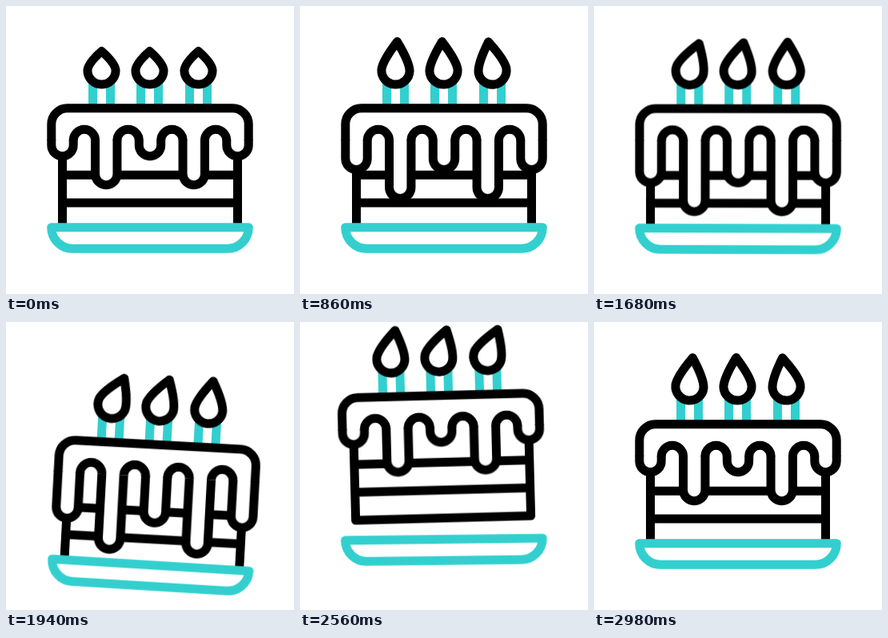
Recreate the animation shown at these times as an HTML page without scripts. Size 360 by 360 pixels, loop 3 s.

```html
<!DOCTYPE html>
<html lang="en">
<head>
<meta charset="utf-8">
<title>Birthday cake</title>
<style>
html, body { margin: 0; width: 100%; height: 100%; overflow: hidden; background: #fff; }
svg { display: block; width: 100vw; height: 100vh; }
path { fill: #fff; stroke: #000; stroke-width: 11; stroke-linejoin: round; }
.teal { stroke: #33cfcf; }
.line { fill: none; }

.cake, .plate, .drips, .flame { animation: 3s infinite; }
.cake, .plate { animation-timing-function: cubic-bezier(.6, 0, .6, 1); }
.cake { transform-origin: 180px 277px; animation-name: hop; }
.plate { transform-origin: 180px 290px; animation-name: tip; animation-timing-function: ease-in-out; }
.drips { animation-name: drip; animation-timing-function: linear; }
.flame { animation-timing-function: ease-in-out; }
.left { animation-name: grow, left; }
.mid { animation-name: grow, mid; }
.right { animation-name: grow, right; }

/* sink, leap, land */
@keyframes hop {
  0%, 54.5%, 95%, 100% { transform: translate(0, 0) rotate(0deg); }
  64.67% { transform: translate(2.3px, 25.5px) rotate(3.1deg); }
  84% { transform: translate(-1px, -36.5px) rotate(-1.5deg); }
}
@keyframes tip {
  0%, 54.5%, 95%, 100% { transform: translate(0, 0) rotate(0deg); }
  64.67% { transform: translate(0, 27px) rotate(3.5deg); }
  80% { transform: translate(0, -7px) rotate(-.9deg); }
}
@keyframes drip {
  0%, 95%, 100% { transform: translateY(0); }
  65% { transform: translateY(38px); }
  75.33% { transform: translateY(12px); }
  84% { transform: translateY(-1.7px); }
}
@keyframes grow {
  0% { d: path("M0-24Q17-9 17.6 0A17.6 17.6 0 0 1-17.6 0Q-17-9 0-24Z"); }
  15%, 100% { d: path("M0-36Q17-11 17.6 0A17.6 17.6 0 0 1-17.6 0Q-17-11 0-36Z"); }
}
@keyframes left {
  0% { rotate: 0deg } 15% { rotate: -5deg } 41% { rotate: 10deg } 65% { rotate: 22deg }
  75% { rotate: -4deg } 85% { rotate: 10deg } 100% { rotate: 6deg }
}
@keyframes mid {
  0%, 41% { rotate: 0deg } 15% { rotate: -7deg } 65% { rotate: 16deg }
  75% { rotate: -6deg } 85% { rotate: 17deg } 100% { rotate: -3deg }
}
@keyframes right {
  0%, 75% { rotate: 0deg } 15%, 41%, 100% { rotate: -8deg }
  65% { rotate: 6deg } 85% { rotate: 22deg }
}
</style>
</head>
<body>
<svg viewBox="0 0 360 360">
  <defs>
    <path id="drop" d="M-13.7-80V0a13.7 13.7 0 0 0 27.4 0V-80"/>
    <path id="arch" class="line" d="M-13.7 168a13.7 13.7 0 0 1 27.4 0"/>
    <path id="sticks" class="teal line" d="M-11 94V126m22 0V94"/>
    <clipPath id="below"><path d="M0 167.5H360V360H0Z"/></clipPath>
  </defs>
  <g class="cake">
    <use href="#sticks" x="119.5"/>
    <use href="#sticks" x="179.5"/>
    <use href="#sticks" x="240.5"/>
    <path d="M70.5 180V281H289.5V180M70.5 211.3H289.5M70.5 246H289.5"/>
    <g clip-path="url(#below)">
      <g class="drips">
        <use href="#drop" x="70.5" y="174"/>
        <use href="#drop" x="125.25" y="210"/>
        <use href="#drop" x="180" y="174"/>
        <use href="#drop" x="234.75" y="210"/>
        <use href="#drop" x="289.5" y="174"/>
      </g>
    </g>
    <path class="line" d="M56.8 168V147.7a20 20 0 0 1 20-20H283.2a20 20 0 0 1 20 20V168"/>
    <use href="#arch" x="97.9"/>
    <use href="#arch" x="152.6"/>
    <use href="#arch" x="207.4"/>
    <use href="#arch" x="262.1"/>
    <g transform="translate(119.5 80.5)"><path class="flame left" d="M0-36Q17-11 17.6 0A17.6 17.6 0 0 1-17.6 0Q-17-11 0-36Z"/></g>
    <g transform="translate(179.5 80.5)"><path class="flame mid" d="M0-36Q17-11 17.6 0A17.6 17.6 0 0 1-17.6 0Q-17-11 0-36Z"/></g>
    <g transform="translate(240.5 80.5)"><path class="flame right" d="M0-36Q17-11 17.6 0A17.6 17.6 0 0 1-17.6 0Q-17-11 0-36Z"/></g>
  </g>
  <path class="teal plate" d="M56.7 276.7H303.3a26.6 26.6 0 0 1-26.6 26.6H83.3a26.6 26.6 0 0 1-26.6-26.6Z"/>
</svg>
</body>
</html>
```
